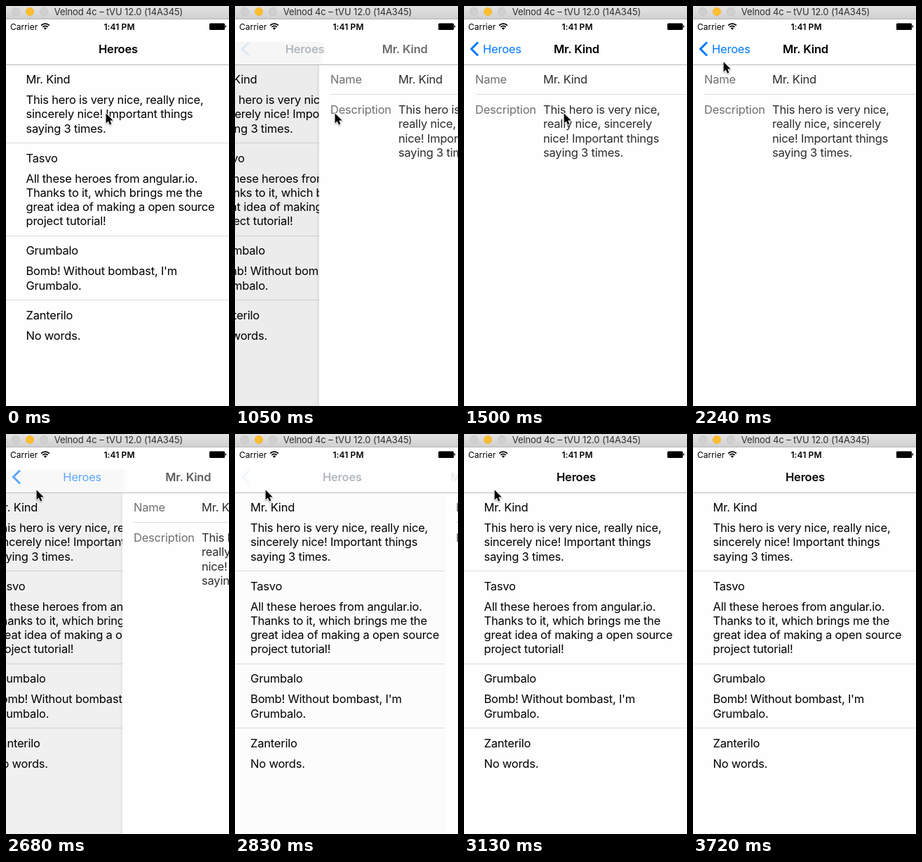
Write an HTML page with a canvas that moves like this. It is 318 px wide and 568 px high and loops after 5.07 s.

```html
<!DOCTYPE html>
<html lang="en">
<head>
<meta charset="utf-8">
<title>Heroes</title>
<style>
  html, body { margin: 0; width: 100%; height: 100%; overflow: hidden; background: #fff; }
  canvas { display: block; width: 318px; height: 568px; }
</style>
</head>
<body>
<canvas id="stage"></canvas>
<script>
const W = 318, H = 568, SCREEN = 320, LOOP = 5070;
const NAV_BOTTOM = 83, LINE = 20.3;
const BLUE = '#007aff';

const canvas = document.getElementById('stage');
const ctx = canvas.getContext('2d');
const ratio = window.devicePixelRatio || 1;
canvas.width = W * ratio;
canvas.height = H * ratio;

// The screen refreshes only at these moments.
const ticks = [0, 1050, 1200, 1350, 1500, 1800, 1950, 2090, 2240,
  2680, 2830, 2980, 3130, 3430, 3570, 3720];

// [from time, tip x, tip y]
const pointer = [
  [0, 142.6, 152.4], [1800, 111.6, 133.4], [1950, 53.6, 92.4], [2090, 42.6, 79.4],
  [2240, 43.6, 79.6], [3430, 50, 88.4], [3570, 194.6, 115.4], [3720, -50, -50]
];

const heroes = [
  ['Mr. Kind', ['This hero is very nice, really nice,', 'sincerely nice! Important things', 'saying 3 times.']],
  ['Tasvo', ['All these heroes from angular.io.', 'Thanks to it, which brings me the', 'great idea of making a open source', 'project tutorial!']],
  ['Grumbalo', ["Bomb! Without bombast, I'm", 'Grumbalo.']],
  ['Zanterilo', ['No words.']]
];
const detail = ['This hero is very nice,', 'really nice, sincerely', 'nice! Important things', 'saying 3 times.'];

const PUSH = 930, PUSH_BAR = 941, POP = 2582;
const clamp = v => Math.max(0, Math.min(1, v));

// Critically damped spring: the share of the way still to go.
function remaining(ms) {
  const p = 0.0177 * Math.max(0, ms);
  const r = (1 + p) * Math.exp(-p);
  return r < 0.002 ? 0 : r;
}

function text(str, x, y, { size = 16.5, weight = 400, color = '#000', align = 'left', track = -0.21, alpha = 1 } = {}) {
  if (alpha <= 0) return;
  ctx.save();
  ctx.globalAlpha = alpha;
  ctx.font = `${weight} ${size}px Inter, Roboto, sans-serif`;
  ctx.letterSpacing = track + 'px';
  ctx.textAlign = align;
  ctx.fillStyle = color;
  ctx.fillText(str, x, Math.round(y));
  ctx.restore();
}

function paragraph(lines, x, y, style) {
  lines.forEach((line, i) => text(line, x, y + i * LINE, style));
}

function box(x, y, w, h, color) {
  ctx.fillStyle = color;
  ctx.fillRect(x, y, w, h);
}

function fade(x0, x1, y, h, from, to) {
  const g = ctx.createLinearGradient(x0, 0, x1, 0);
  g.addColorStop(0, from);
  g.addColorStop(1, to);
  box(x0, y, x1 - x0, h, g);
}

function drawList(x) {
  box(0, NAV_BOTTOM, W, H, '#fefefe');
  let top = NAV_BOTTOM;
  heroes.forEach(([name, lines], row) => {
    if (row) box(0, Math.floor(top), W, 1, '#dcdcde');
    text(name, 28.5 + x, top + 27);
    paragraph(lines, 28.5 + x, top + 56);
    top += 50.6 + lines.length * LINE;
  });
}

function drawDetail(x) {
  const label = { color: '#707070' }, value = { color: '#2c2c2c' };
  box(x, NAV_BOTTOM, SCREEN, H, '#fefefe');
  text('Name', x + 16, 110, label);
  text(heroes[0][0], x + 113, 110, value);
  box(x + 16, 125, SCREEN, 1, '#dcdcde');
  text('Description', x + 16, 153, label);
  paragraph(detail, x + 113, 153, value);
}

// open: 0 shows the list, 1 shows the detail
function drawContent(open) {
  const edge = Math.round(SCREEN * (1 - open));
  if (open < 1) {
    drawList(-96 * open);
    box(0, NAV_BOTTOM, W, H, `rgba(0,0,0,${0.11 * open})`);
  }
  if (open > 0) {
    if (open < 1) fade(edge - 5, edge, NAV_BOTTOM, H, 'rgba(0,0,0,0)', `rgba(0,0,0,${0.1 * open})`);
    drawDetail(edge);
  }
}

function drawChevron(alpha) {
  ctx.save();
  ctx.globalAlpha = alpha;
  ctx.strokeStyle = BLUE;
  ctx.lineWidth = 3;
  ctx.beginPath();
  ctx.moveTo(20, 51.5);
  ctx.lineTo(10.5, 61);
  ctx.lineTo(20, 70.5);
  ctx.stroke();
  ctx.restore();
}

function drawBar(open, contentOpen, alpha) {
  box(0, 19, W, NAV_BOTTOM - 19, '#fff');
  if (contentOpen > 0.01 && contentOpen < 0.99) {
    const edge = SCREEN * (1 - contentOpen);
    const tint = `rgba(0,0,0,${0.055 * contentOpen})`;
    box(0, 51, edge, 32, tint);
    fade(edge, edge + 10, 51, 32, tint, 'rgba(0,0,0,0)');
  }
  box(0, NAV_BOTTOM, W, 1, '#b9b9bb');
  const listX = 132 - 105 * open;
  drawChevron(alpha.back);
  text('Heroes', listX, 67, { color: BLUE, alpha: alpha.back });
  text('Heroes', listX, 67, { weight: 600, alpha: alpha.list });
  text(heroes[0][0], 128 + 192 * (1 - open), 67, { weight: 600, alpha: alpha.detail });
}

function drawWindowBar() {
  const g = ctx.createLinearGradient(0, 0, 0, 18);
  g.addColorStop(0, '#e3e3e3');
  g.addColorStop(1, '#d0d0d0');
  box(0, 0, W, 18, g);
  box(0, 18, W, 1, '#b4b4b4');
  [['#d0d0d0', '#c2c2c2'], ['#fdbd2f', '#f3b433'], ['#d0d0d0', '#c2c2c2']].forEach(([fill, rim], i) => {
    ctx.beginPath();
    ctx.arc(14 + i * 20, 8, 5.6, 0, 7);
    ctx.fillStyle = fill;
    ctx.fill();
    ctx.strokeStyle = rim;
    ctx.lineWidth = 0.8;
    ctx.stroke();
  });
  text('Velnod 4c – tVU 12.0 (14A345)', 160.5, 13, { size: 13, color: '#2e2e2e', align: 'center', track: -0.12 });
}

function drawStatus() {
  text('Carrier', 6, 34, { size: 12, track: 0 });
  text('1:41 PM', 161.5, 34, { size: 12, weight: 600, align: 'center', track: 0.1 });

  ctx.strokeStyle = ctx.fillStyle = '#000';
  ctx.lineWidth = 1.8;
  [8.3, 5.2].forEach(r => {
    ctx.beginPath();
    ctx.arc(56, 33.5, r, -Math.PI * 0.75, -Math.PI * 0.25);
    ctx.stroke();
  });
  ctx.beginPath();
  ctx.moveTo(56, 33.8);
  ctx.arc(56, 33.8, 3, -Math.PI * 0.75, -Math.PI * 0.25);
  ctx.fill();

  ctx.beginPath();
  ctx.roundRect(290, 24.5, 22, 9.5, 1.5);
  ctx.fill();
  box(312.5, 27.5, 1.5, 3, '#000');
}

function drawPointer(t) {
  const [, x, y] = pointer.filter(p => p[0] <= t).pop();
  ctx.save();
  ctx.translate(x, y);
  ctx.beginPath();
  ctx.moveTo(0, 0);
  [[0, 14], [3.2, 11], [5.4, 16], [7.8, 15], [5.7, 10], [10, 10]].forEach(p => ctx.lineTo(...p));
  ctx.closePath();
  ctx.lineJoin = 'round';
  ctx.lineWidth = 1.8;
  ctx.strokeStyle = '#fff';
  ctx.shadowColor = 'rgba(0,0,0,.35)';
  ctx.shadowBlur = 2 * ratio;
  ctx.shadowOffsetY = ratio;
  ctx.stroke();
  ctx.shadowColor = 'transparent';
  ctx.fillStyle = '#000';
  ctx.fill();
  ctx.restore();
}

function barAlpha(t) {
  if (t < POP) {
    const u = Math.max(0, t - PUSH_BAR);
    return { list: clamp(1 - u / 140), detail: clamp(u / 190), back: clamp((u - 90) / 200) };
  }
  const u = t - POP;
  return { list: clamp((u - 200) / 190), detail: clamp(1 - u / 270), back: clamp(1 - u / 265) };
}

function openness(t, pushStart) {
  return t < POP ? 1 - remaining(t - pushStart) : remaining(t - POP);
}

function snap(v) {
  return v < 0.01 ? 0 : v > 0.99 ? 1 : v;
}

function draw(now) {
  const time = now % LOOP;
  const t = ticks.filter(k => k <= time).pop();
  const open = openness(t, PUSH);
  ctx.setTransform(ratio, 0, 0, ratio, 0, 0);
  drawContent(open);
  drawBar(snap(openness(t, PUSH_BAR)), open, barAlpha(t));
  drawStatus();
  drawWindowBar();
  drawPointer(t);
}

const start = performance.now();
function loop() {
  draw(performance.now() - start);
  requestAnimationFrame(loop);
}
loop();
</script>
</body>
</html>
```
